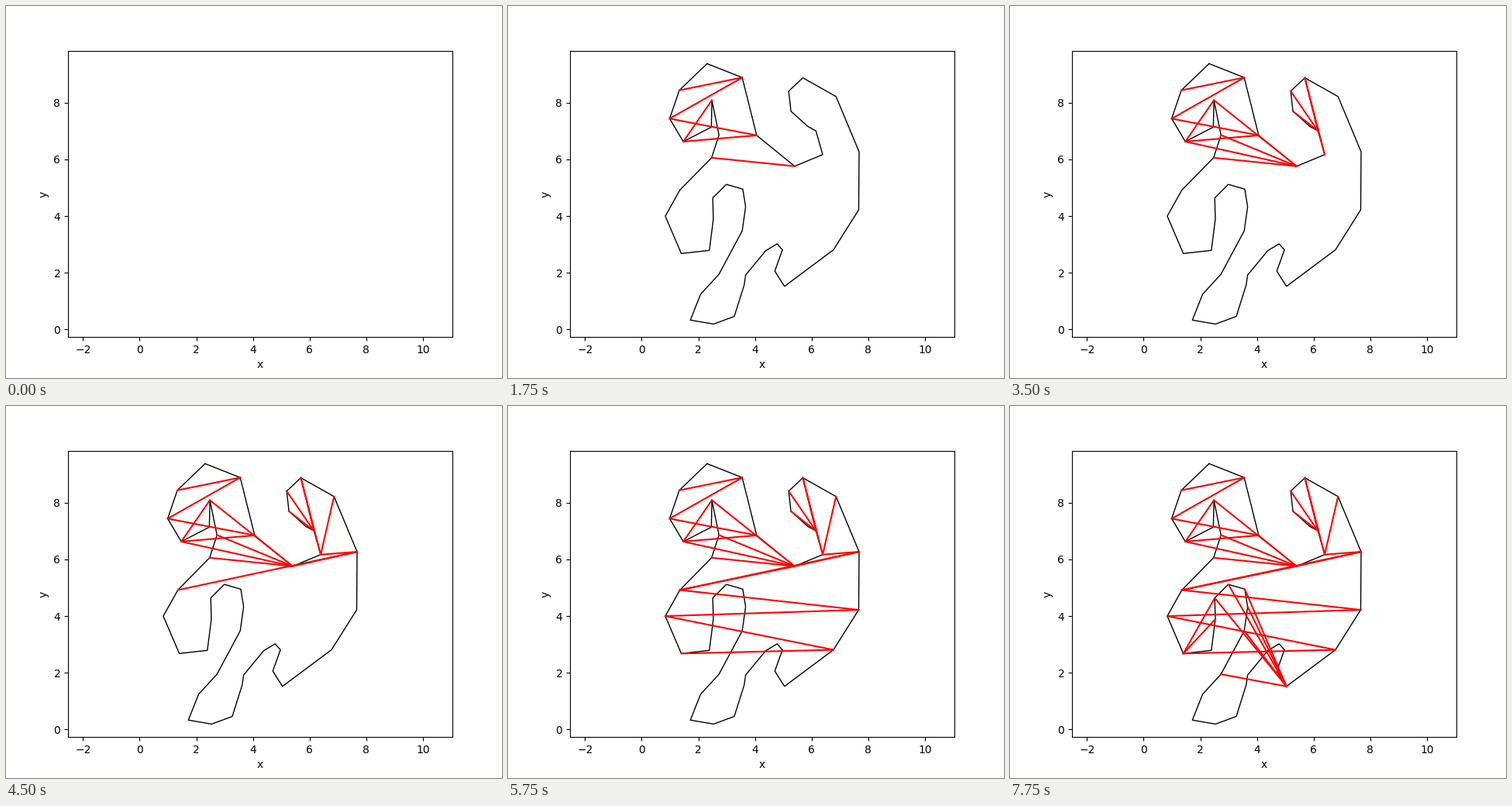
A matplotlib script for the animation above (8 s loop, 640 px wide and 480 px high).

```python
from itertools import islice

import matplotlib.pyplot as plt
from matplotlib.animation import FuncAnimation

FRAMES, INTERVAL = 32, 250

# Corners of the polygon, clockwise from the highest one
OUTLINE = [
    (2.31, 9.38), (3.55, 8.89), (4.06, 6.85), (5.40, 5.76), (6.39, 6.17),
    (6.15, 7.01), (5.87, 7.16), (5.27, 7.70), (5.19, 8.41), (5.69, 8.88),
    (6.86, 8.22), (7.675, 6.27), (7.66, 4.22), (6.77, 2.81), (5.04, 1.52),
    (4.70, 2.06), (4.97, 2.81), (4.78, 3.02), (4.38, 2.78), (3.67, 1.92),
    (3.62, 1.57), (3.27, 0.46), (2.54, 0.19), (1.72, 0.33), (2.08, 1.24),
    (2.73, 1.95), (3.55, 3.48), (3.67, 4.33), (3.57, 4.95), (2.99, 5.12),
    (2.51, 4.64), (2.53, 3.89), (2.39, 2.79), (1.40, 2.68), (0.835, 4.00),
    (1.35, 4.92), (2.47, 6.06), (2.73, 6.86), (2.48, 8.09), (2.46, 7.14),
    (1.47, 6.63), (0.99, 7.44), (1.33, 8.44),
]


def height(point):
    return point[1]


def sweep(points):
    """Merge the two chains below the top corner, always taking the higher head."""
    low = points.index(min(points, key=height))
    right, left = points[1:low], points[:low - 1:-1]
    yield points[0], 1
    while left or right:
        if not left or (right and right[0][1] > left[0][1]):
            yield right.pop(0), -1
        else:
            yield left.pop(0), 1


def turn(a, b, c):
    return (b[0] - a[0]) * (c[1] - b[1]) - (b[1] - a[1]) * (c[0] - b[0])


def diagonals(points):
    """Triangulate as a monotone polygon with a stack of open corners."""
    corners = sweep(points)
    stack = [next(corners)[0], next(corners)[0]]
    last_side = -1
    for point, side in corners:
        if side != last_side:
            for other in stack[:0:-1]:
                yield point, other
            stack = [stack[-1]]
        else:
            while len(stack) > 1 and side * turn(stack[-2], stack[-1], point) > 0:
                stack.pop()
                yield point, stack[-1]
        stack.append(point)
        last_side = side


def add_path(points, color, width):
    return ax.plot(*zip(*points), color=color, lw=width, visible=False)[0]


fig, ax = plt.subplots(figsize=(6.4, 4.8), dpi=100)
ax.set_xlabel("x")
ax.set_ylabel("y")

steps = [add_path(OUTLINE + OUTLINE[:1], "black", 1)]
steps += [add_path(pair, "red", 1.5)
          for pair in islice(diagonals(OUTLINE), FRAMES - 2)]
ax.axis("equal")


def draw(frame):
    for i, line in enumerate(steps):
        line.set_visible(i < frame)
    return steps


anim = FuncAnimation(fig, draw, frames=FRAMES, interval=INTERVAL,
                     repeat=True, repeat_delay=0)
plt.show()
```
